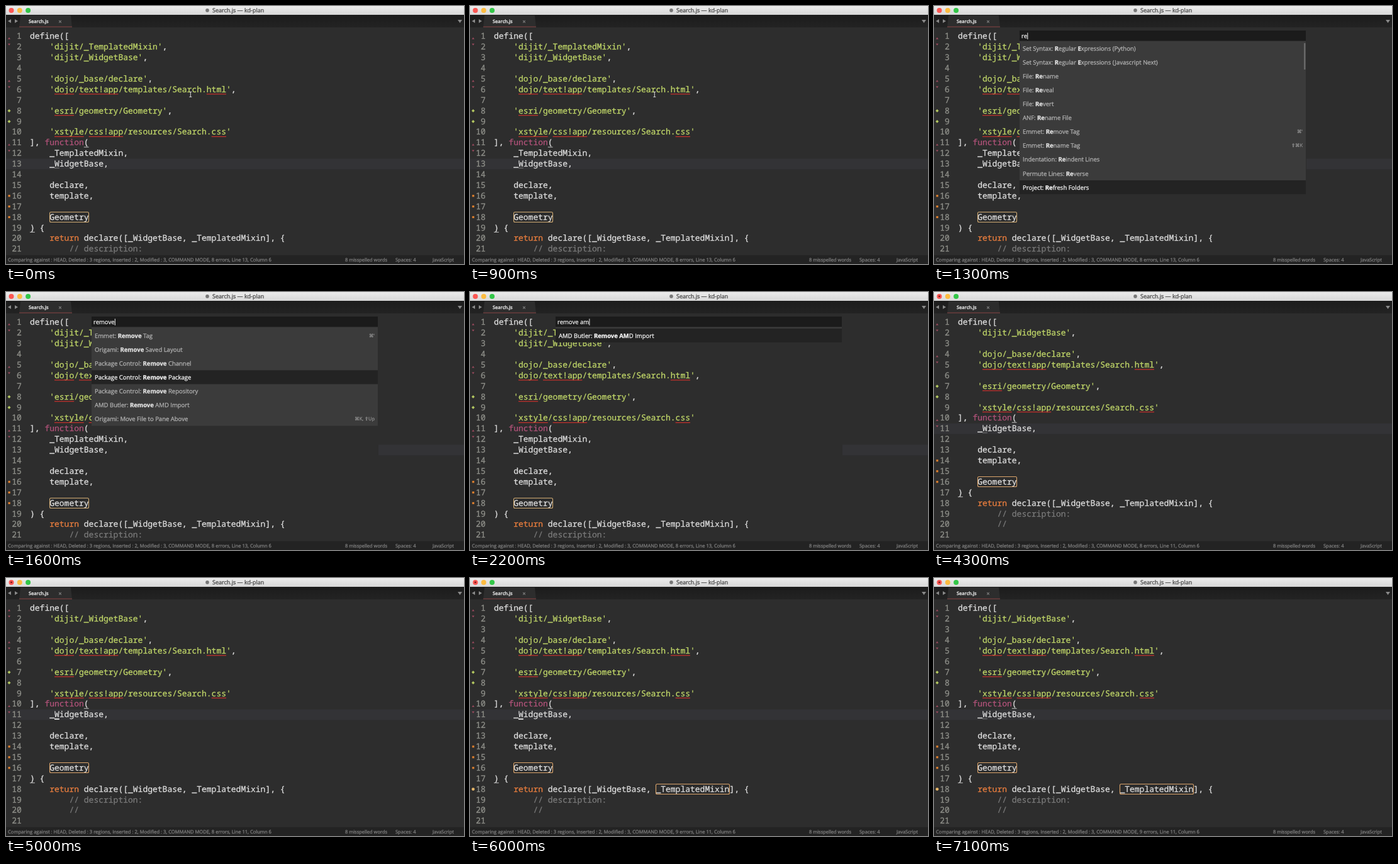
An HTML page with a canvas that plays this animation: 728 px wide and 410 px high, repeating every 7200 ms.

```html
<!DOCTYPE html>
<html lang="en">
<head>
<meta charset="utf-8">
<title>Editor: remove import</title>
<style>
  html, body { margin: 0; width: 100%; height: 100%; overflow: hidden; background: #2d2d2d; }
  canvas { display: block; width: 728px; height: 410px; }
</style>
</head>
<body>
<canvas></canvas>
<script>
const W = 728, H = 410, LOOP = 7200;
const OPEN = 1000, ENTER = 2400, PICK = 2500, REMOVED = 4200, LINTED = 5800;
const CELL = 7.8, ROW = 16.9, CODE_X = 38;
const MONO = '13px "Noto Sans Mono", monospace';
const ui = (size, weight = 400) => `${weight} ${size}px "Open Sans", "Noto Sans", "DejaVu Sans", sans-serif`;

const canvas = document.querySelector('canvas');
const ctx = canvas.getContext('2d');
const ratio = window.devicePixelRatio || 1;
canvas.width = W * ratio;
canvas.height = H * ratio;
ctx.scale(ratio, ratio);
ctx.textRendering = 'geometricPrecision';
ctx.lineJoin = 'round';

// Gutter marks: d = lines deleted below, + = inserted, m = modified
const before = [
  ['define([', 'd'],
  ["    'dijit/_TemplatedMixin',"],
  ["    'dijit/_WidgetBase',"],
  [''],
  ["    'dojo/_base/declare',", 'd'],
  ["    'dojo/text!app/templates/Search.html',"],
  [''],
  ["    'esri/geometry/Geometry',", '+'],
  ['', '+'],
  ["    'xstyle/css!app/resources/Search.css'"],
  ['], function(', 'd'],
  ['    _TemplatedMixin,'],
  ['    _WidgetBase,'],
  [''],
  ['    declare,'],
  ['    template,', 'm'],
  ['', 'm'],
  ['    Geometry', 'm'],
  [') {'],
  ['    return declare([_WidgetBase, _TemplatedMixin], {'],
  ['        // description:'],
  ['        //'],
  ['']
];
const after = before.filter(([text]) => !/^ +'?(dijit\/)?_TemplatedMixin/.test(text));

// Asterisks enclose the matched letters; the second item is the shortcut
const reCommands = [
  ['Set Syntax: *R*egular *E*xpressions (Python)'],
  ['Set Syntax: *R*egular *E*xpressions (Javascript Next)'],
  ['File: *Re*name'],
  ['File: *Re*veal'],
  ['File: *Re*vert'],
  ['ANF: *Re*name File'],
  ['Emmet: *Re*move Tag', "⌘'"],
  ['Emmet: *Re*name Tag', '⇧⌘K'],
  ['Indentation: *Re*indent Lines'],
  ['Permute Lines: *Re*verse'],
  ['Project: *Re*fresh Folders']
];
const removeCommands = [
  ['Emmet: *Remove* Tag', "⌘'"],
  ['Origami: *Remove* Saved Layout'],
  ['Package Control: *Remove* Channel'],
  ['Package Control: *Remove* Package'],
  ['Package Control: *Remove* Repository'],
  ['AMD Butler: *Remove* AMD Import'],
  ['Origami: Move File to Pane Above', '⌘K, ⇧Up']
];
const amdCommands = [['AMD Butler: *Remove AM*D Import']];

const typing = [
  [1000, ''], [1200, 'r'], [1300, 're'], [1400, 'rem'], [1500, 'remo'], [1600, 'remove'],
  [1900, 'remove '], [2100, 'remove a'], [2200, 'remove am']
];

const imports = [
  ['dijit/_TemplatedMixin', '_TemplatedMixin'],
  ['dijit/_WidgetBase', '_WidgetBase'],
  ['dojo/_base/declare', 'declare'],
  ['dojo/text!app/templates/Search.html', 'template'],
  ['esri/geometry/Geometry', 'Geometry'],
  ['xstyle/css!app/resources/Search.css', '']
];

function rect(x, y, w, h, color) {
  ctx.fillStyle = color;
  ctx.fillRect(x, y, w, h);
}

// A hairline stroke gives the letters a medium weight.
function text(string, x, y, font, color, align = 'left') {
  ctx.font = font;
  ctx.fillStyle = ctx.strokeStyle = color;
  ctx.textAlign = align;
  ctx.lineWidth = 0.3;
  ctx.fillText(string, x, y);
  ctx.strokeText(string, x, y);
  return ctx.measureText(string).width;
}

function dot(x, y, r, color) {
  ctx.fillStyle = color;
  ctx.beginPath();
  ctx.arc(x, y, r, 0, 7);
  ctx.fill();
}

function shape(points, color) {
  ctx.fillStyle = color;
  ctx.beginPath();
  points.forEach(([x, y]) => ctx.lineTo(x, y));
  ctx.fill();
}

function verticalGradient(y0, y1, from, to) {
  const g = ctx.createLinearGradient(0, y0, 0, y1);
  g.addColorStop(0, from);
  g.addColorStop(1, to);
  return g;
}

const colX = col => CODE_X + col * CELL;
const baseline = line => 52.3 + (line - 1) * ROW;
const isFocused = t => t < OPEN || t >= REMOVED;

function drawWindow(edited) {
  rect(0, 0, W, 14, verticalGradient(0, 14, '#ececec', '#d8d8d8'));
  ['#fc5753', '#fdbc40', '#33c748'].forEach((color, i) => dot(8.5 + i * 13.3, 6.9, 4, color));
  if (edited) dot(8.5, 6.9, 1.4, '#7d1a17');
  dot(320, 6.9, 2.8, '#777');
  text('Search.js — kd-plan', 328, 10.3, ui(9), '#4a4a4a');

  rect(0, 14, W, 20, verticalGradient(14, 34, '#1c1c1c', '#232323'));
  shape([[21, 34], [23, 15], [103, 15], [105, 34]], '#2d2d2d');
  rect(21, 32.5, 84, 1.2, '#7a4040');
  shape([[3, 24], [8, 21], [8, 27]], '#8a8a8a');
  shape([[19, 24], [14, 21], [14, 27]], '#8a8a8a');
  shape([[718, 22], [725, 22], [721.5, 27]], '#8a8a8a');
  text('Search.js', 36, 27, ui(7.4, 600), '#e6e6e6');
  text('×', 86, 27.5, ui(9), '#888', 'center');
}

function drawMark(mark, line) {
  const y = baseline(line) - 4;
  if (mark === 'd') {
    shape([[3, y + 4.5], [5, y + 1.5], [7, y + 4.5]], '#9c4a5e');
    shape([[3, y + 11.5], [7, y + 11.5], [5, y + 14.5]], '#9c4a5e');
  } else if (mark === '+') {
    shape([[5, y - 2.5], [7.5, y], [5, y + 2.5], [2.5, y]], '#b4c860');
  } else if (mark === 'm') {
    rect(3.5, y - 1.7, 3.2, 3.2, '#e0812f');
  }
}

function tokenColor(token) {
  if (token[0] === "'") return '#bfd568';
  if (token.startsWith('//')) return '#797979';
  if (token === 'function') return '#b05279';
  if (token === 'return') return '#e87d3e';
  return '#dcdcdc';
}

function drawCode(string, line) {
  const y = baseline(line);
  let col = 0;
  for (const token of string.split(/('[^']*'|\/\/.*|function|return)/)) {
    if (token) text(token, colX(col), y, MONO, tokenColor(token));
    col += token.length;
  }
  if (string.includes("'")) {
    for (const m of string.matchAll(/dojo(?=\/text)|text!app|html|esri|xstyle|css(!app)?/g)) {
      rect(colX(m.index), y + 2.5, m[0].length * CELL, 1.3, '#c0302c');
    }
  }
}

function outline(line, col, length, color) {
  ctx.strokeStyle = color;
  ctx.lineWidth = 1.1;
  ctx.beginPath();
  ctx.roundRect(Math.round(colX(col)) + 0.5, Math.round(baseline(line) - 13) + 0.5,
    Math.round(length * CELL), 16, 2);
  ctx.stroke();
}

function drawEditor(t) {
  const removed = t >= REMOVED;
  const focused = isFocused(t);
  const lines = removed ? after : before;
  const caretLine = removed ? 11 : 13;

  rect(0, 34, W, 362, '#2d2d2d');
  // Without focus only the end of the current line keeps its tint.
  rect(focused ? 0 : 592, baseline(caretLine) - 12.5, W, ROW, '#333336');

  lines.slice(0, 21).forEach(([string, mark], i) => {
    const line = i + 1;
    text(line, 24.8, baseline(line), MONO, '#8f908a', 'right');
    drawMark(mark, line);
    drawCode(string, line);
    const bracket = string.endsWith('function(') ? 11 : string === ') {' ? 0 : -1;
    if (focused && bracket >= 0) rect(colX(bracket), baseline(line) + 2.4, CELL, 1, '#c0c0c0');
    if (string.endsWith(' Geometry')) outline(line, 4, 8, removed ? '#dca56c' : '#d2ac74');
  });

  if (focused) {
    const lit = (t + (removed ? 400 : 900)) % 1000 < 500;
    rect(colX(5), baseline(caretLine) + 2, CELL, lit ? 1.8 : 1, lit ? '#eee' : '#777');
  }
  if (t >= LINTED) {
    dot(5, baseline(18) - 4, 2.4, '#e5b567');
    outline(18, 33, 15, '#dca56c');
  }
  if (t < OPEN) {
    rect(292.8, 136.5, 1, 8, '#ddd');
    rect(291.3, 136, 4, 0.9, '#ddd');
    rect(291.3, 144, 4, 0.9, '#ddd');
  }
}

function drawStatus(t) {
  const line = t >= REMOVED ? 11 : 13;
  const errors = t >= LINTED ? 9 : 8;
  const color = '#7c7c7c';
  rect(0, 396, W, 14, '#232323');
  text('Comparing against : HEAD, Deleted : 3 regions, Inserted : 2, Modified : 3, COMMAND MODE, ' +
    `${errors} errors, Line ${line}, Column 6`, 3, 406, ui(7.6), color);
  text('8 misspelled words', 539, 406, ui(7.5), color);
  text('Spaces: 4', 619, 406, ui(7.5), color);
  text('JavaScript', 678, 406, ui(7.5), color);
}

function drawPanel(x, width, bottom, query) {
  rect(x, 39, width, bottom - 39, '#3b3b3b');
  rect(x, 39, width, 16.5, '#1b1b1b');
  const end = x + 3 + text(query, x + 3, 51.3, ui(9.5), '#e8e8e8');
  rect(end + 0.3, 42.5, 1, 10.5, '#f0f0f0');
}

function drawPalette(t) {
  const query = typing.findLast(([start]) => t >= start)[1];
  const long = query.length <= 2;
  const commands = long ? reCommands : query.length < 9 ? removeCommands : amdCommands;
  const selected = long ? 10 : commands === amdCommands ? 0 : 3;
  const step = 22.1, top = long ? 56 : 58;

  drawPanel(136, 455, top + commands.length * step, query);
  commands.forEach(([label, shortcut], i) => {
    const y = top + i * step;
    const active = i === selected;
    if (active) rect(136, y, 455, step, '#232323');
    let x = 141;
    label.split('*').forEach((part, k) => {
      const bold = k % 2 && query;
      const color = active ? '#f4f4f4' : bold ? '#e2e2e2' : '#b0b0b0';
      x += text(part, x, y + 14.6, ui(9.5, bold ? 700 : 400), color);
    });
    if (shortcut) text(shortcut, 586, y + 13.5, ui(7.4), '#8c8c8c', 'right');
  });
  if (long) rect(588, 59, 2.5, 42, '#686868');
}

function drawPicker() {
  const step = 37.1;
  drawPanel(234, 259.5, 280.5, '');
  rect(234, 58, 259.5, step, '#232323');
  imports.forEach(([path, name], i) => {
    const y = 58 + i * step;
    text(path, 238.5, y + 14.6, ui(9.6), i ? '#b4b4b4' : '#f4f4f4');
    text(name, 241, y + 27, ui(7.4), '#8c8c8c');
  });
}

function draw(t) {
  drawEditor(t);
  drawWindow(t >= REMOVED);
  drawStatus(t);
  if (t >= OPEN && t < ENTER) drawPalette(t);
  if (t >= PICK && t < REMOVED) drawPicker();
}

const start = performance.now();
function frame() {
  draw((performance.now() - start) % LOOP);
  requestAnimationFrame(frame);
}
frame();
</script>
</body>
</html>
```
